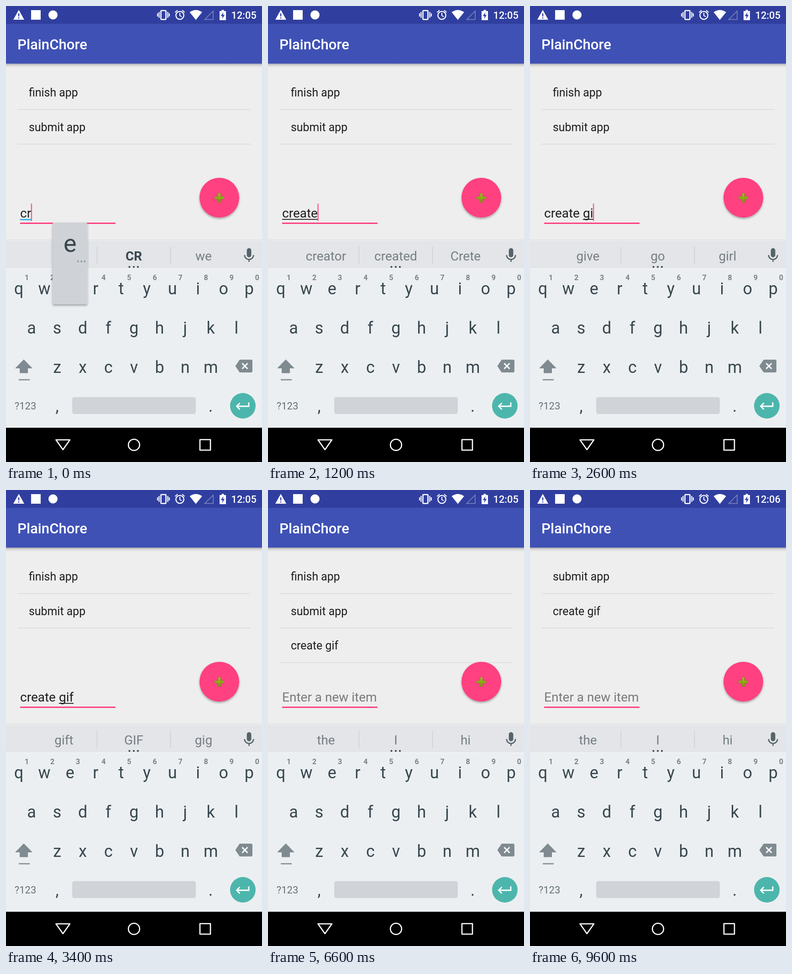
Write an HTML page that moves like this. It is 561 px wide and 998 px high and loops after 9.7 s.

```html
<!DOCTYPE html>
<html lang="en">
<head>
<meta charset="utf-8">
<title>To-do list</title>
<style>
  html, body { margin: 0; width: 100%; height: 100%; overflow: hidden; background: #000; }
  svg { display: block; width: 561px; height: 998px; font-family: Roboto, sans-serif; }
  text { white-space: pre; }
  .mid { text-anchor: middle; }
  .key { font-size: 36px; fill: #37474f; }
  .item { font-size: 24.9px; fill: #1d1d1d; }
  .word { font-size: 28px; fill: #757e83; }
  .word.bold { font-weight: 700; fill: #37474f; }
  .line { fill: none; stroke: #fff; }
</style>
</head>
<body>
<svg viewBox="0 0 561 998">
  <defs>
    <linearGradient id="barShadow" x2="0" y2="1">
      <stop stop-opacity=".3"/><stop offset=".4" stop-opacity=".1"/><stop offset="1" stop-opacity="0"/>
    </linearGradient>
    <linearGradient id="plusFill" x2="0" y2="1">
      <stop stop-color="#a4c51a"/><stop offset="1" stop-color="#6f9a0c"/>
    </linearGradient>
    <filter id="drop" x="-30%" y="-30%" width="160%" height="160%">
      <feDropShadow dx="0" dy="2.5" stdDeviation="2.2" flood-opacity=".34"/>
    </filter>
    <clipPath id="rowClip"><rect x="25" y="151" width="511" height="75"/></clipPath>
    <clipPath id="fabClip"><circle cx="467.5" cy="419.5" r="43.5"/></clipPath>
  </defs>

  <rect width="561" height="998" fill="#eee"/>
  <rect y="126" width="561" height="9" fill="url(#barShadow)"/>
  <rect width="561" height="126" fill="#3f51b5"/>
  <rect width="561" height="39" fill="#303f9f"/>
  <text x="25" y="95" font-size="31.2" font-weight="500" fill="#fff">PlainChore</text>

  <!-- status bar -->
  <g fill="#fff">
    <path d="M28 8.500 40 30H16Z"/>
    <path d="M28 16v7M28 25v2.500" stroke="#303f9f" stroke-width="2.400"/>
    <rect x="55" y="9" width="21" height="21"/>
    <circle cx="103" cy="19.500" r="10"/>
    <rect class="line" x="339.500" y="10" width="11" height="19.500" rx="1.500" stroke-width="2.600"/>
    <path class="line" d="M335.500 13v13M332.200 16v7M354.500 13v13M357.800 16v7" stroke-width="2.200"/>
    <circle class="line" cx="381" cy="20.500" r="8.700" stroke-width="2.300"/>
    <path class="line" d="M381 15v6l4 2.500M370.500 14l5.500-4.800M391.500 14l-5.500-4.800" stroke-width="2"/>
    <path d="M402.500 13.500Q416 4 429.800 13.500L416 30.500Z"/>
    <path class="line" d="M435.500 29.500H454V11Z" stroke-width="1.500" opacity=".4"/>
    <path d="M468 11h4.500V8.500h5V11h4.500v20h-14Z"/>
    <path d="M476.500 13.500 470.800 22H474.500L473.500 28.500 479.300 19.500H475.500Z" fill="#303f9f"/>
    <text id="clock" x="493.500" y="28" font-size="21.800" font-weight="500"></text>
  </g>

  <g id="list"></g>
  <g clip-path="url(#rowClip)">
    <circle id="rowRipple" cx="280" cy="189"/>
  </g>

  <!-- input field -->
  <rect x="31" y="474" width="209" height="3" fill="#ff4081"/>
  <text id="input" x="31" y="463" font-size="28"></text>
  <rect id="composing"/>
  <rect id="cursor" y="432.500" width="2.400" height="38" fill="#ff4081" opacity=".85"/>

  <!-- add button -->
  <g id="fab" filter="url(#drop)"><circle cx="467.500" cy="419.500" r="43.500" fill="#ff4081"/></g>
  <g clip-path="url(#fabClip)"><circle id="fabRipple" cx="467.500" cy="419.500" fill="#fff" opacity=".25"/></g>
  <path d="M465 410h5v7.500h7.500v5H470v7.500h-5v-7.500h-7.500v-5h7.500Z" fill="url(#plusFill)"
        stroke="#6c9415" stroke-width=".8" stroke-linejoin="round"/>

  <!-- keyboard -->
  <rect y="511.500" width="561" height="2" fill="#dfe0e1"/>
  <rect y="513" width="561" height="410" fill="#eceff1"/>
  <rect y="514.500" width="561" height="60" fill="#e3e5e8"/>
  <rect y="574.500" width="561" height="1.500" fill="#f5f6f7"/>
  <path d="M199.500 527v38M360.500 527v38" stroke="#cacdd0" stroke-width="1.300"/>
  <g id="words"></g>
  <g id="dots" fill="#37474f">
    <circle cx="270.500" cy="571" r="2.100"/><circle cx="280" cy="571" r="2.100"/><circle cx="289" cy="571" r="2.100"/>
  </g>
  <rect x="527.700" y="530" width="9.800" height="20" rx="4.900" fill="#566369"/>
  <path d="M522.800 545a9.800 9.800 0 0 0 19.600 0M532.600 555v5" fill="none" stroke="#566369" stroke-width="2.600"/>
  <g id="keys"></g>
  <path d="M39 773.500 58 793H48v10.500H30V793H20Z" fill="#7f8b90"/>
  <path d="M28 818h24" stroke="#7f8b90" stroke-width="2.600"/>
  <path d="M512 774h25q3 0 3 3v22q0 3-3 3H512L502.500 788Z" fill="#7f8b90"/>
  <path class="line" d="M517.500 782l12 12M529.500 782l-12 12" stroke-width="3"/>
  <text class="mid" x="42.500" y="882.500" font-size="22" fill="#657278">?123</text>
  <rect id="space" x="145" y="856" width="271" height="37" rx="5"/>
  <circle cx="519" cy="875" r="28" fill="#4db6ac"/>
  <path class="line" d="M532 867.500v8.500H506M512.500 869l-7 7 7 7" stroke-width="2.800"/>

  <!-- navigation bar -->
  <rect y="923" width="561" height="75"/>
  <g class="line" stroke-width="2.600" stroke-linejoin="round">
    <path d="M109.500 949.500h30.500L124.800 971Z"/>
    <circle cx="280.500" cy="960.500" r="12.300"/>
    <rect x="425" y="949" width="23" height="23"/>
  </g>

  <g id="popup">
    <rect x="-38" y="474" width="76" height="179" rx="3" fill="#cfd3d7" filter="url(#drop)"/>
    <text id="popupKey" class="mid" y="538" font-size="54" fill="#37474f"></text>
    <g id="popupDots" fill="#8f989c">
      <circle cx="17.500" cy="559" r="2"/><circle cx="25" cy="559" r="2"/><circle cx="32" cy="559" r="2"/>
    </g>
  </g>
</svg>

<script>
const LOOP = 9700;
const $ = id => document.getElementById(id);
const set = (id, attrs) => {
  for (const name in attrs) $(id).setAttribute(name, attrs[name]);
};
const show = (id, on) => set(id, { visibility: on ? 'visible' : 'hidden' });
const label = (cls, x, y, text) => `<text class="${cls}" x="${x}" y="${y}">${text}</text>`;

const ruler = document.createElement('canvas').getContext('2d');
const widthOf = text => {
  ruler.font = '28px Roboto, sans-serif';
  return ruler.measureText(text).width;
};

// Each key remembers its place for the preview popup
const places = {};
let keys = label('mid key', 112, 888, ',') + label('mid key', 448.5, 888, '.');
[['qwertyuiop', 28], ['asdfghjkl', 56], ['zxcvbnm', 112.2]].forEach(([letters, left], row) => {
  [...letters].forEach((letter, i) => {
    const x = left + 56.1 * i;
    places[letter] = { x, dy: 86 * row };
    keys += label('mid key', x, 630.5 + 86 * row, letter);
    if (row === 0) {
      keys += `<text class="mid" x="${x + 17.5}" y="599.5" font-size="16" font-weight="700" fill="#78838a">${(i + 1) % 10}</text>`;
    }
  });
});
$('keys').innerHTML = keys;

// Changes merge in order; "*" marks the automatic correction
const timeline = [
  [0, { text: 'cr', words: 'cr,*CR,we', key: 'e', items: ['finish app', 'submit app'], composing: true }],
  [100, { text: 'cre', key: '' }],
  [200, { words: 'cre,*create,credit', key: 'a' }],
  [300, { text: 'crea', key: '' }],
  [400, { words: 'crea,*create,cream' }],
  [800, { key: 't' }],
  [900, { text: 'creat', key: '' }],
  [1000, { words: 'creat,*create,cream', key: 'e' }],
  [1100, { text: 'create', key: '' }],
  [1200, { words: 'creator,created,Crete' }],
  [1800, { key: ' ' }],
  [1900, { text: 'create ', key: '', words: '', composing: false }],
  [2100, { key: 'g', words: 'free,a,folder' }],
  [2200, { text: 'create g', key: '', composing: true }],
  [2300, { words: 'good,g,get' }],
  [2400, { key: 'i' }],
  [2500, { text: 'create gi', key: '' }],
  [2600, { words: 'give,go,girl' }],
  [2700, { key: 'f' }],
  [2800, { text: 'create gif', key: '' }],
  [2900, { words: 'gift,GIF,gig' }],
  [4300, { text: '', items: ['finish app', 'submit app', 'create gif'], composing: false }],
  [4400, { words: '' }],
  [4500, { words: 'the,I,hi' }],
  [7700, { items: ['submit app', 'create gif'] }],
];
const cursorToggles = [800, 900, 1700, 1900, 3400, 3900, 4500, 5100, 5500,
  6000, 6600, 7100, 7600, 8100, 8600, 9100, 9600];

function drawInput({ text, words, composing }, time) {
  $('input').textContent = text || 'Enter a new item';
  set('input', { fill: text ? '#1d1d1d' : '#7a7a7a' });

  const start = widthOf(text.slice(0, text.lastIndexOf(' ') + 1));
  const end = widthOf(text);
  const corrected = words.includes('*');
  show('composing', composing);
  set('composing', {
    x: 31 + start, y: 466, width: end - start,
    height: corrected ? 3 : 1.8, fill: corrected ? '#33b5e5' : '#1d1d1d',
  });
  set('cursor', { x: 31.3 + Math.max(0, end - 0.8) });
  show('cursor', cursorToggles.filter(t => t <= time).length % 2 === 0);
}

function drawRipples(time) {
  const held = (time - 7000) / 700;
  const fade = Math.min(1, (7900 - time) / 200);
  const rowOn = held > 0 && fade > 0;
  show('rowRipple', rowOn);
  if (rowOn) set('rowRipple', { r: 300 * Math.min(1, held), opacity: 0.16 * fade });

  const pressed = time >= 4100 && time < 4500;
  show('fabRipple', pressed);
  if (pressed) {
    set('fabRipple', { r: Math.min(44, (time - 4000) / 5), opacity: 0.25 * Math.min(1, (4500 - time) / 200) });
  }
}

function draw(time) {
  const state = Object.assign({}, ...timeline.filter(([t]) => t <= time).map(([, change]) => change));
  $('clock').textContent = time < 8400 ? '12:05' : '12:06';

  $('list').innerHTML = state.items.map((item, i) =>
    label('item', 50, 198 + 75.6 * i, item) +
    `<rect x="25" y="${226 + 75.6 * i}" width="511" height="1.200" fill="#d5d5d5"/>`).join('');

  $('words').innerHTML = state.words.split(',').map((word, i) =>
    label(word[0] === '*' ? 'mid word bold' : 'mid word', 127 + 153 * i, 557, word.replace('*', ''))).join('');
  show('dots', state.words);

  drawInput(state, time);
  drawRipples(time);

  const place = places[state.key];
  show('popup', place);
  if (place) {
    set('popup', { transform: `translate(${place.x} ${place.dy})` });
    $('popupKey').textContent = state.key;
  }
  show('popupDots', place && !'gf'.includes(state.key));
  set('space', { fill: state.key === ' ' ? '#b4babe' : '#d0d3d7' });
}

let shown = -1;
function tick() {
  const time = Math.floor(performance.now() % LOOP / 100) * 100;
  if (time !== shown) draw(shown = time);
  requestAnimationFrame(tick);
}
tick();
</script>
</body>
</html>
```
